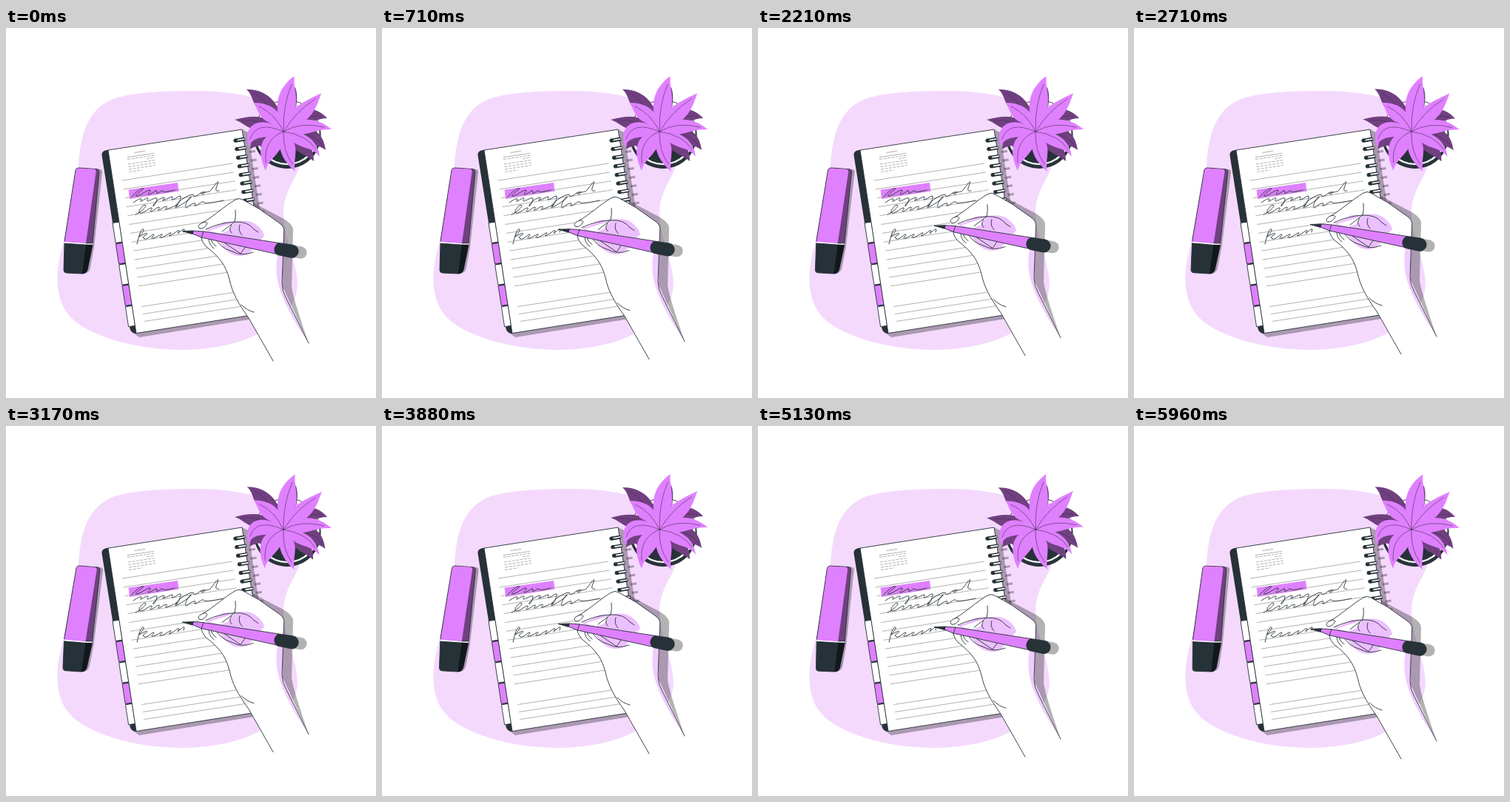
Animation, 500 px wide and 500 px high, one loop 6 s. Source, as an HTML page:

```html
<!DOCTYPE html>
<html lang="en">
<head>
<meta charset="utf-8">
<title>Writing in a notebook</title>
<style>
html, body { margin: 0; width: 100%; height: 100%; overflow: hidden; background: #fff; }
svg { display: block; width: 100vw; height: 100vh; }
.ink { fill: none; stroke: #263238; stroke-width: .9; stroke-linecap: round; stroke-linejoin: round; }
.out { stroke: #263238; stroke-width: .9; stroke-linejoin: round; }
.vein { fill: none; stroke: #4a2a57; stroke-width: .6; stroke-linecap: round; }
.dark { fill: #263238; }
.white { fill: #fff; }
.pink { fill: #df80ff; }
.deep { fill: #704080; }
.pale { fill: #ecbfff; }
.shade { fill: #000; opacity: .3; }
.rule { fill: none; stroke: #999; stroke-width: .75; }
</style>
</head>
<body>
<svg viewBox="0 0 500 500">
  <path fill="#f4d9fd" d="M98 186C101 140 112 106 150 94C185 85 225 85 262 85C310 86 350 94 374 112C394 130 403 166 396 190C389 208 376 222 375 248C375 286 394 315 394 348C392 386 352 411 318 423C290 432 260 435 235 435C190 434 150 426 118 411C82 395 66 372 70 325C75 285 95 250 98 186Z"/>

  <g id="marker">
    <path class="shade" d="M122 190L128 191Q131 192 130 196L119 296L114 324Q112 332 105 332L100 332Z"/>
    <path class="deep out" d="M98 189L122 190.500Q126 191 126 194L117 291L79 288L94 192Q95 189 98 189Z"/>
    <path class="pink" d="M98 189.500L119 190.500Q122 191 121.500 195L108 291L79.500 289L94.500 192Q95 189.500 98 189.500Z"/>
    <path class="dark out" d="M79 291L117 293L110 327Q108 332 103 332L82 331Q78 331 78 327Z"/>
    <path fill="#10181c" d="M108 292.500L117 293L110 327Q108 332 103 332Z"/>
    <path fill="none" stroke="#fff" stroke-width="1.300" d="M79.500 289.900L108 291.900L117 292.200"/>
  </g>

  <g id="book">
    <path class="shade" d="M319 137L327 141L365 388L180 418L172 412Z"/>
    <g id="ringShade" stroke="#000" stroke-opacity=".3" stroke-width="3"></g>
    <path class="dark" d="M139 164.500L134 165.500Q129 167 129.500 172L144 263L167 404Q168 413 177 413Z"/>
    <g id="tabs" class="out"></g>
    <path class="white out" d="M138 165L319 137L357 384L176 412.500Z"/>
    <path class="pink" d="M165.500 218.500L232 209L233.500 220.500L167 231Z"/>
    <g id="rules" class="rule"></g>
    <g class="rule">
      <path d="M173 168.500L188 166.300M163.500 174.800L200 169.300"/>
      <path stroke-dasharray="4 1.500" d="M164 177.500L200 172M190 176.500L200 175M165 184L201 178.500M165.500 187.500L201.500 182M166 191L202 185.500M166.500 194.500L184 191.800"/>
    </g>
    <g class="ink">
      <path d="M170 228C174 223 183 215 186 217C185 219 173 226 176 227C182 227 191 218 195 219C196 220 190 225 193 225C197 224 202 219 204 220C204 222 202 224 205 223C208 222 210 219 212 220C212 223 219 221 228 219"/>
      <path d="M172 236C176 233 181 230 183 231C184 232 180 235 183 234C187 232 190 229 192 230C193 231 189 234 192 234C196 233 200 229 204 230C205 231 201 240 199 241C197 239 208 229 214 229C216 231 209 233 212 233C217 232 222 228 225 228C226 230 222 232 226 232C230 230 233 227 236 227C237 229 233 239 230 241C227 240 238 230 246 227C249 225 254 225 254 226C252 228 256 228 259 226C263 222 268 221 269 222C268 225 262 225 264 223C268 221 274 223 277 219C281 214 286 206 287 208C285 214 280 222 288 220"/>
      <path d="M175 252C182 249 192 240 188 239C183 240 177 250 181 250C188 250 193 243 197 243C198 245 193 248 196 248C201 246 204 242 207 242C208 244 203 247 207 246C211 244 214 241 217 241C219 243 213 245 217 245C225 242 233 238 232 239C230 242 226 244 231 242C238 239 253 228 250 228C245 231 240 244 244 243C250 238 254 236 256 237C256 239 253 241 257 240C261 238 264 234 267 235C268 238 280 236 294 233"/>
      <path d="M177 292C179 284 182 270 186 272C187 276 178 282 180 282C186 279 190 276 191 278C190 280 182 282 187 285C193 286 197 278 200 279C199 282 194 285 199 284C206 282 211 277 211 279C209 281 206 284 211 283C218 280 223 275 223 277C222 279 218 282 223 280C229 277 233 272 234 274L232 278C236 274 240 271 241 272L240 276"/>
    </g>
    <g id="rings"></g>
  </g>

  <g id="pot">
    <circle class="dark" cx="380" cy="144.500" r="45.500"/>
    <circle class="white out" cx="380" cy="141.500" r="44"/>
    <circle class="dark" cx="380" cy="143" r="40"/>
    <path class="white" d="M385 104A40 40 0 0 1 419 133L384 140Z"/>
  </g>

  <g id="plant">
    <g class="deep">
      <path d="M375 140C358 118 336 116 309 124C322 128 328 139 345 138Z"/>
      <path d="M375 140C374 104 354 82 325 83C335 92 332 104 345 113Z"/>
      <path d="M375 140C372 116 380 92 391 80C395 92 394 108 385 125Z"/>
      <path d="M375 140C388 112 412 98 434 122C420 122 412 130 400 132Z"/>
      <path d="M375 140C404 128 428 134 432 165C420 155 404 160 392 152Z"/>
      <path d="M375 140C348 132 330 142 330 164C340 156 352 162 364 150Z"/>
      <path d="M375 140C396 144 416 152 416 180C404 170 390 168 380 152Z"/>
    </g>
    <path class="vein" d="M375 140Q345 122 318 125M375 140Q356 98 334 88M375 140Q404 114 426 120M375 140Q416 140 427 158"/>
    <g class="pink">
      <path d="M375 140C375 112 358 101 335 101C341 112 342 122 356 128Z"/>
      <path d="M375 140C380 108 402 100 426 88C419 110 412 124 392 132Z"/>
      <path d="M375 140C352 118 318 124 328 160C336 144 350 150 366 144Z"/>
      <path d="M375 140C342 140 338 166 351 193C354 176 372 172 378 146Z"/>
      <path d="M375 140C364 158 372 178 391 194C387 176 398 164 384 146Z"/>
      <path d="M375 140C388 138 420 142 424 174C414 160 398 164 386 152Z"/>
      <path d="M375 140C388 122 416 116 440 137C424 136 414 142 394 145Z"/>
      <path d="M375 140C361 108 364 84 389.500 65C388 84 400 104 382 130Z"/>
    </g>
    <path class="vein" d="M375 140Q364 116 342 106M375 140Q392 112 418 96M375 140Q338 124 330 150M375 140Q348 150 351 182M375 140Q374 166 387 184M375 140Q406 144 419 164M375 140Q398 126 430 134M375 140Q374 104 386 76"/>
  </g>

  <g id="hand">
    <path class="shade" d="M330 234L368 254Q389 264 388 274L386 350Q388 366 409 426L374 350L372 270Z"/>
    <path class="white" d="M260 270Q258 265 266 263C280 255 296 240 310 232Q315 229 320 232L343 245L370 264Q377 269 375.500 277L373 345Q373 356 379 366L409 426L361 450L328 392C313 371 306 358 302 340C297 320 288 309 270 295Q262 285 265 281Z"/>
    <path fill="#f0ccff" d="M374.500 288Q363 306 366 335C369 362 389 396 409 426L379 366Q373 356 373 345Z"/>
    <path class="pale" d="M270 273Q290 266 294 262L309 262Q327 258 337 265Q347 272 349 281L338 292L329 304Q317 312 304 305Q293 299 284 281Z"/>
    <path class="white" d="M274 274L309 263L300 274L290 278Z"/>
    <path class="ink" d="M361 450L328 392C313 371 306 358 302 340C297 320 288 309 270 295Q261 284 266 280Q275 277 283 283Q288 297 306 302Q318 309 334 303M318 374Q326 382 335 384"/>
    <path class="ink" d="M262 271Q258 269 262 265Q270 260 272 264Q268 272 262 271M266 263C280 255 296 240 310 232Q315 229 320 232L343 245L370 264Q377 269 375.500 277L373 345Q373 356 379 366L409 426"/>
    <path class="ink" d="M310 246Q311 254 309 262Q289 263 270 272M309 262Q327 261 335 272M309 262L292 275M316 266Q313 274 319 280M305 266Q300 272 305 277M335 272L341 276M295 290L317 305L324 295M274 285Q274 293 281 298M277 286Q278 291 284 295"/>
    <path class="shade" d="M386 293L400 295.500A8 8 0 0 1 397 311.500L382 309Z"/>
    <path class="pink out" d="M253 274L267 275L369 290.500L366 305.500L264 283L252 278Z"/>
    <path class="ink" d="M267 275L264 283"/>
    <path class="dark out" d="M238 274.500L253 274L252 278.500Z"/>
    <path class="dark out" d="M369 290.500L388 293.300A8.600 8.600 0 0 1 385 310.300L367 306.500Q362 304 363 297Q365 291 369 290.500Z"/>
  </g>
</svg>
<script>
const el = id => document.getElementById(id);
const range = (n, f) => Array.from({ length: n }, (_, i) => f(i)).join('');

el('tabs').innerHTML = range(5, i => {
  const x = 144 + i * 4.35, y = 263.5 + i * 28.3;
  return `<path class="${i % 2 ? 'pink' : 'white'}" d="M${x} ${y}l9 -1.400l4.200 27l-9 1.400z"/>`;
});

el('rules').innerHTML = range(16, i => {
  const y = i < 13 ? 206 + i * 11.9 : 376.5 + (i - 13) * 10;
  return `<path d="M${157 + (y - 206) * .154} ${y}l149 -23"/>`;
});

const ringAt = i => [309 + i * 1.8, 152 + i * 11.6];
el('rings').innerHTML = range(9, i => {
  const [x, y] = ringAt(i);
  return `<g transform="translate(${x} ${y})" fill="none" stroke-linecap="round">
    <path stroke="#263238" stroke-width="5" d="M2 0L12 -1.700"/>
    <path stroke="#fff" stroke-width="1.700" d="M4 -.500L13 -2"/>
    <circle class="dark" cx="1" cy="0" r="2.600"/></g>`;
});
el('ringShade').innerHTML = range(9, i => {
  const [x, y] = ringAt(i);
  return `<path d="M${x + 18} ${y + 4}l8 -1.300"/>`;
});

// Sway in degrees: 0, +1, -1, 0 at 0, 25, 75 and 100 % of the period.
function sway(t, delay, period) {
  if (t < delay) return 0;
  const p = (t - delay) / period % 1;
  return p < .25 ? p * 4 : p < .75 ? 2 - p * 4 : p * 4 - 4;
}

function draw() {
  const t = performance.now() % 6000;
  const move = (id, value) => el(id).setAttribute('transform', value);
  move('hand', `translate(0 ${-10 * (1 - Math.abs(1 - t / 3000))})`);
  move('marker', `rotate(${sway(t, 1500, 6000)} 102 260)`);
  move('plant', `rotate(${sway(t, 2400, 3000)} 375 129)`);
  requestAnimationFrame(draw);
}
draw();
</script>
</body>
</html>
```
